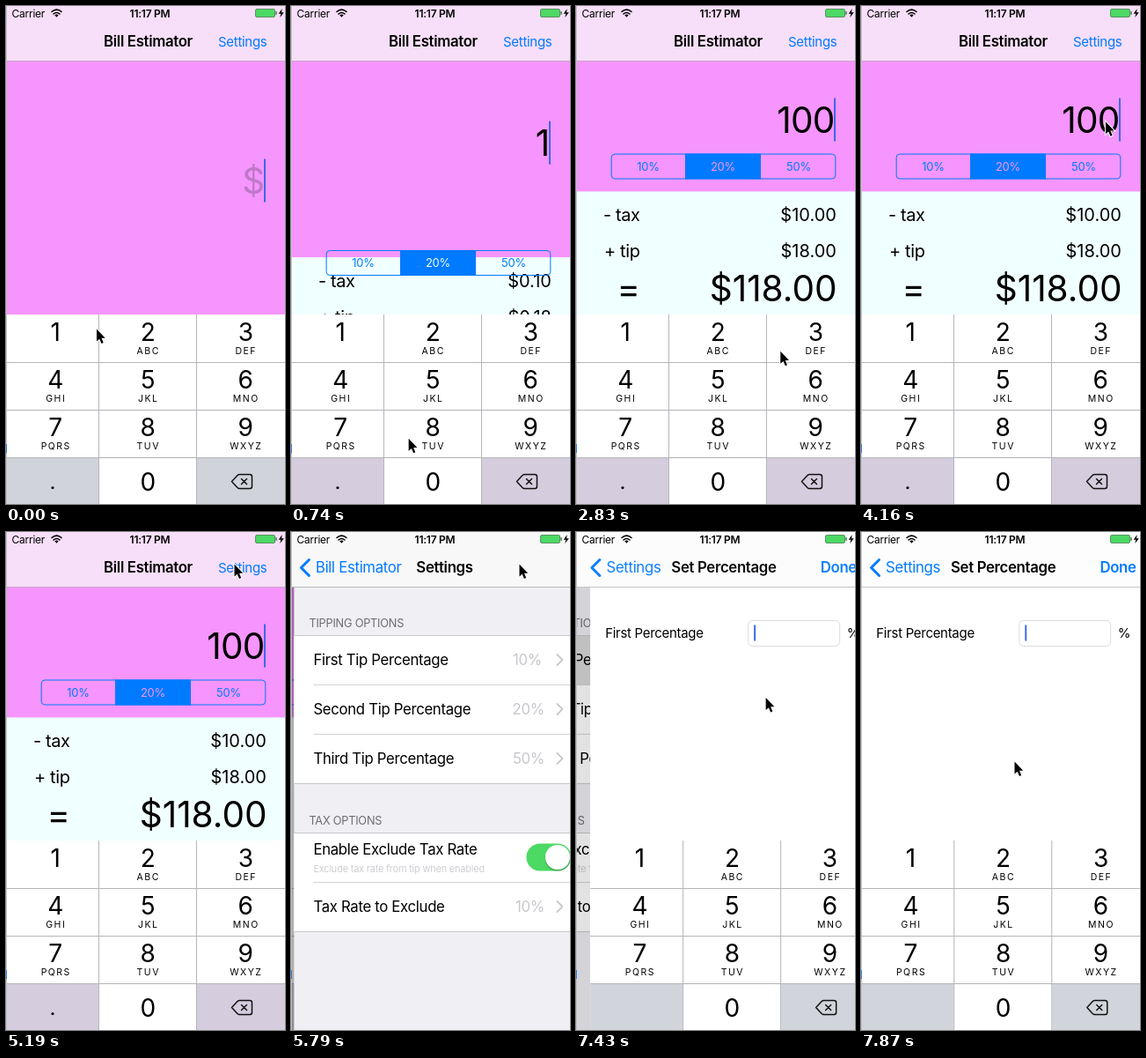
Write an HTML page that moves like this. It is 317 px wide and 565 px high and loops after 8000 ms.

```html
<!DOCTYPE html>
<html lang="en">
<head>
<meta charset="utf-8">
<title>Bill Estimator</title>
<style>
  html, body { margin: 0; width: 100%; height: 100%; overflow: hidden; background: #fff; }
  svg { display: block; width: 317px; height: 565px; }
  text { font-family: Inter, Roboto, sans-serif; letter-spacing: -.02em; white-space: pre; }
  .letters { letter-spacing: 1.5px; }
  .sum { letter-spacing: 0; text-anchor: end; }
  .mid { text-anchor: middle; }
  .end { text-anchor: end; }
  .semi { font-weight: 600; }
  .line { fill: none; stroke-linecap: round; stroke-linejoin: round; }
</style>
</head>
<body>
<svg id="stage" viewBox="0 0 317 565"></svg>
<script>
const LOOP = 8000, FRAME = 148.55, WIDTH = 317;
const BLUE = '#007aff', PINK = '#f595fd', AZURE = '#f0ffff', GREY = '#c7c7cc', TITLE = 'Bill Estimator';

const text = (x, y, str, size, cls = '', fill = '#000', id = '') =>
  `<text id="${id}" x="${x}" y="${y}" font-size="${size}" class="${cls}" fill="${fill}">${str}</text>`;
const rect = (x, y, w, h, fill, extra = '') =>
  `<rect x="${x}" y="${y}" width="${w}" height="${h}" fill="${fill}" ${extra}/>`;
const path = (d, stroke, width) =>
  `<path class="line" d="${d}" stroke="${stroke}" stroke-width="${width}"/>`;
const group = (id, content) => `<g id="${id}">${content}</g>`;

function keypad(name, withDot) {
  const letters = ['', 'ABC', 'DEF', 'GHI', 'JKL', 'MNO', 'PQRS', 'TUV', 'WXYZ'];
  const centers = [56, 161, 272];
  let out = rect(0, 350, WIDTH, 215, '#fff') +
    rect(1, 350, 104, 54, '#d1d5db', `id="${name}Key1" opacity="0"`) +
    rect(106, 513, 110, 52, '#d5cddd', `id="${name}Key0" opacity="0"`) +
    rect(0, 513, 105, 52, '#d1d5db', `class="${name}Side"`) +
    rect(217, 513, 100, 52, '#d1d5db', `class="${name}Side"`);
  letters.forEach((label, i) => {
    const x = centers[i % 3], y = 380 + 54 * Math.floor(i / 3);
    out += text(x, y, i + 1, 28, 'mid') + text(x + .75, y + 15, label, 10.5, 'mid letters');
  });
  out += text(161, 550, 0, 28, 'mid');
  for (const y of [404, 458, 512]) out += rect(0, y, WIDTH, 1, '#b4b5b9');
  for (const x of [105, 216]) out += rect(x, 350, 1, 215, '#b4b5b9');
  if (withDot) out += '<circle cx="53" cy="546.5" r="1.6"/>';
  return out +
    path('M256.5 539.5 263 532.5Q264 531.5 265.5 531.5H277Q279.5 531.5 279.5 534V545Q279.5 547.5 277 547.5H265.5Q264 547.5 263 546.5Z', '#111', 1.5) +
    path('M267.5 536.5 273.5 542.5M273.5 536.5 267.5 542.5', '#111', 1.5);
}

function mainView() {
  const segment = rect(40.2, 168, 254.6, 28, 'none', `rx="4" stroke="${BLUE}"`) +
    rect(124, 167.5, 86, 29, BLUE) +
    text(82, 186.5, '10%', 13, 'mid', BLUE) +
    text(167, 186.5, '20%', 13, 'mid', PINK, 'chosen') +
    text(253, 186.5, '50%', 13, 'mid', BLUE);
  const panel = rect(0, 210.4, WIDTH, 360, AZURE) +
    text(31, 244, '- tax', 20) + text(295.9, 244, '', 20, 'sum', '#000', 'tax') +
    text(32, 285, '+ tip', 20) + text(295.9, 285, '', 20, 'sum', '#000', 'tip') +
    text(46.5, 335, '=', 40) + text(296.5, 335, '', 40.5, 'sum', '#000', 'total');
  return rect(0, 0, WIDTH, 565, PINK) + group('panel', panel) + group('segment', segment) +
    group('entry', text(293.5, 144, '', 40.5, 'end', '#000', 'amount') +
      rect(293, 104.5, 2, 49, '#3f68ea', 'id="caret"')) +
    keypad('main', true) + rect(0, 0, WIDTH, 565, '#000', 'id="mainDim" opacity="0"');
}

function settingsView() {
  const chevron = y => path(`M299 ${y - 6}l6 6-6 6`, GREY, 1.8);
  const row = (y, label, value, end = 284.5) =>
    text(22, y + 6, label, 16.8) + text(end, y + 6, value, 16.8, 'end', GREY) + chevron(y);
  const block = (top, height) => rect(0, top, WIDTH, height, '#fff') +
    rect(0, top - 1, WIDTH, 1, GREY) + rect(0, top + height - 1, WIDTH, 1, GREY);
  return rect(0, 0, WIDTH, 565, '#efeff4') +
    text(17, 107.5, 'TIPPING OPTIONS', 12.8, '', '#6d6d72') + block(118, 168) +
    rect(0, 118, WIDTH, 56, '#d9d9d9', 'id="rowPress" opacity="0"') +
    rect(22, 173, 295, 1, '#d4d4d8') + rect(22, 229, 295, 1, '#d4d4d8') +
    row(145, 'First Tip Percentage', '10%', 281.5) +
    row(201, 'Second Tip Percentage', '20%') +
    row(257, 'Third Tip Percentage', '50%') +
    text(17, 331.5, 'TAX OPTIONS', 12.8, '', '#6d6d72') + block(342, 112) +
    rect(22, 397, 295, 1, '#d4d4d8') +
    text(22, 366, 'Enable Exclude Tax Rate', 16.8) +
    text(22, 386, 'Exclude tax rate from tip when enabled', 11, '', '#cfcfd3') +
    rect(264, 353.5, 51, 31, '#4cd964', 'rx="15.5"') +
    '<circle cx="299.5" cy="370.5" r="14.5" fill="#000" opacity=".18"/><circle cx="299.5" cy="369" r="14" fill="#fff"/>' +
    row(425, 'Tax Rate to Exclude', '10%') +
    rect(0, 0, WIDTH, 565, '#000', 'id="settingsDim" opacity="0"');
}

const percentView = () => rect(0, 0, WIDTH, 565, '#fff') +
  text(17, 120, 'First Percentage', 15) +
  rect(179.5, 100.5, 104, 29, '#fff', 'rx="5" stroke="#dcdcdc"') +
  rect(186, 105.5, 2, 18, '#3f68ea') + text(291.5, 120, '%', 15) + keypad('percent', false);

const back = label => path('M20.5 31.5 11.5 40.5 20.5 49.5', BLUE, 3) + text(28, 46, label, 16.8, '', BLUE);
const bar = (fill, line) => rect(0, 0, WIDTH, 62, fill) + rect(0, 62, WIDTH, 1, line);
const title = (x, label) => text(x, 46, label, 16.8, 'mid semi');

function statusBar() {
  return text(6.5, 13, 'Carrier', 12) + text(163.5, 13, '11:17 PM', 12, 'mid semi') +
    path('M52 6.5Q57.5 1.8 63 6.5M54 9Q57.5 6 61 9', '#000', 1.6) +
    '<path d="M55.3 10.3Q57.5 8.8 59.7 10.3L57.5 12.8Z"/>' +
    rect(283.5, 3.5, 22, 9, '#4cd964', 'rx="1.5" stroke="#4a7a50" stroke-width=".8"') +
    rect(306.3, 6, 1.5, 4, '#4a7a50', 'rx=".7"') +
    '<path d="M313.7 3 309.7 8.7H312.3L311.3 13 315.8 7.2H313Z"/>';
}

document.getElementById('stage').innerHTML =
  group('main', mainView()) + group('settings', settingsView()) + group('percent', percentView()) +
  group('mainBar', bar('#f8dff9', '#c9a6cc') + title(161.5, TITLE) +
    text(241, 45.5, 'Settings', 15, '', BLUE, 'settingsButton')) +
  group('settingsBar', bar('#f8f8f9', '#b9b9bc') + group('settingsItems', back(TITLE) + title(174.5, 'Settings'))) +
  group('percentBar', bar('#fdfdfd', '#c6c6c9') + group('percentItems', back('Settings') + title(161.5, 'Set Percentage') +
    text(312.5, 46, 'Done', 16.8, 'end semi', BLUE))) +
  statusBar() + rect(0, 0, 1, 565, '#c0c0c2') + rect(0, 497, 1, 10, '#2a7fe0') +
  '<path id="cursor" d="M.5 .5V14.5L3.7 11.7 6 17 8.2 16 6 10.800H10.200Z" stroke="#fff" stroke-width="2" paint-order="stroke"/>';

const el = {};
document.querySelectorAll('[id]').forEach(node => { if (node.id) el[node.id] = node; });
const sideKeys = document.querySelectorAll('.mainSide');

const cursorPath = [
  [0, 102.5, 366], [300, 100, 369], [450, 103, 380], [740, 133, 490], [1190, 160, 536],
  [1790, 165, 538], [2230, 165, 538], [2380, 219, 406], [2830, 232, 391], [3640, 232, 391],
  [4160, 277.5, 130.5], [4750, 259, 36], [6400, 259, 36], [6830, 241, 142], [7150, 241, 142],
  [7870, 174, 260], [8000, 174, 260]
];

function along(points, t) {
  const i = Math.max(1, points.findIndex(p => p[0] >= t));
  const [a, b] = [points[i - 1], points[i]];
  const k = (t - a[0]) / (b[0] - a[0]);
  return [a[1] + (b[1] - a[1]) * k, a[2] + (b[2] - a[2]) * k];
}

const within = (t, ...spans) => spans.some(([from, to]) => t >= from && t < to);
const smooth = k => { k = Math.min(1, Math.max(0, k)); return k * k * (3 - 2 * k); };
const show = (node, alpha) => node.setAttribute('opacity', alpha);
const move = (node, x, y) => node.setAttribute('transform', `translate(${x} ${y})`);
const money = value => '$' + value.toFixed(2);

function drawBill(t) {
  const bill = t < 440 ? 0 : t < 1900 ? 1 : t < 2200 ? 10 : 100;
  const rest = 1 - smooth((t - 452) / 500);
  el.amount.textContent = bill || '$';
  el.amount.setAttribute('fill', bill ? '#000' : '#be78c9');
  el.tax.textContent = money(bill * .1);
  el.tip.textContent = money(bill * .18);
  el.total.textContent = money(bill * 1.18);
  move(el.entry, 0, 69 * rest);
  move(el.panel, 0, 197 * rest);
  move(el.segment, 0, 289 * rest);
  el.chosen.setAttribute('fill', 197 * rest + 210 < 289 * rest + 182 ? AZURE : PINK);
  show(el.caret, within(t, [3100, 3200]) ? .5 : within(t, [2500, 2800], [3200, 3690], [4280, 4700]) ? 0 : 1);
  show(el.mainKey1, within(t, [250, 400]) ? 1 : 0);
  show(el.mainKey0, within(t, [1750, 1900], [2050, 2200]) ? 1 : 0);
  sideKeys.forEach(key => key.setAttribute('fill', bill ? '#d5cddd' : '#d0d4da'));
  show(el.settingsButton, within(t, [4850, 5150]) ? .25 : 1);
}

function drawScreens(t) {
  const toSettings = t < 5750 ? WIDTH : 3.5 * Math.exp((5790 - t) / 150);
  const toPercent = t < 7100 ? WIDTH : WIDTH * Math.exp((7100 - t) / 110);
  const shownSettings = 1 - toSettings / WIDTH, shownPercent = 1 - toPercent / WIDTH;
  move(el.main, -95 * shownSettings, 0);
  show(el.mainDim, .33 * shownSettings);
  move(el.settings, toSettings - 95 * shownPercent, 0);
  show(el.settingsDim, .12 * shownPercent);
  move(el.percent, toPercent, 0);
  show(el.settingsBar, shownSettings > .9 ? 1 : 0);
  show(el.percentBar, shownPercent);
  show(el.settingsItems, 1 - shownPercent);
  move(el.settingsItems, -60 * shownPercent, 0);
  move(el.percentItems, toPercent * .4, 0);
  show(el.rowPress, within(t, [6950, 7900]) ? 1 : 0);
}

function render(now) {
  const t = Math.floor((now % LOOP + 12) / FRAME) * FRAME;
  drawBill(t);
  drawScreens(t);
  move(el.cursor, ...along(cursorPath, t));
}

let start;
function tick(now) {
  start ??= now;
  render(now - start);
  requestAnimationFrame(tick);
}
requestAnimationFrame(tick);
</script>
</body>
</html>
```
